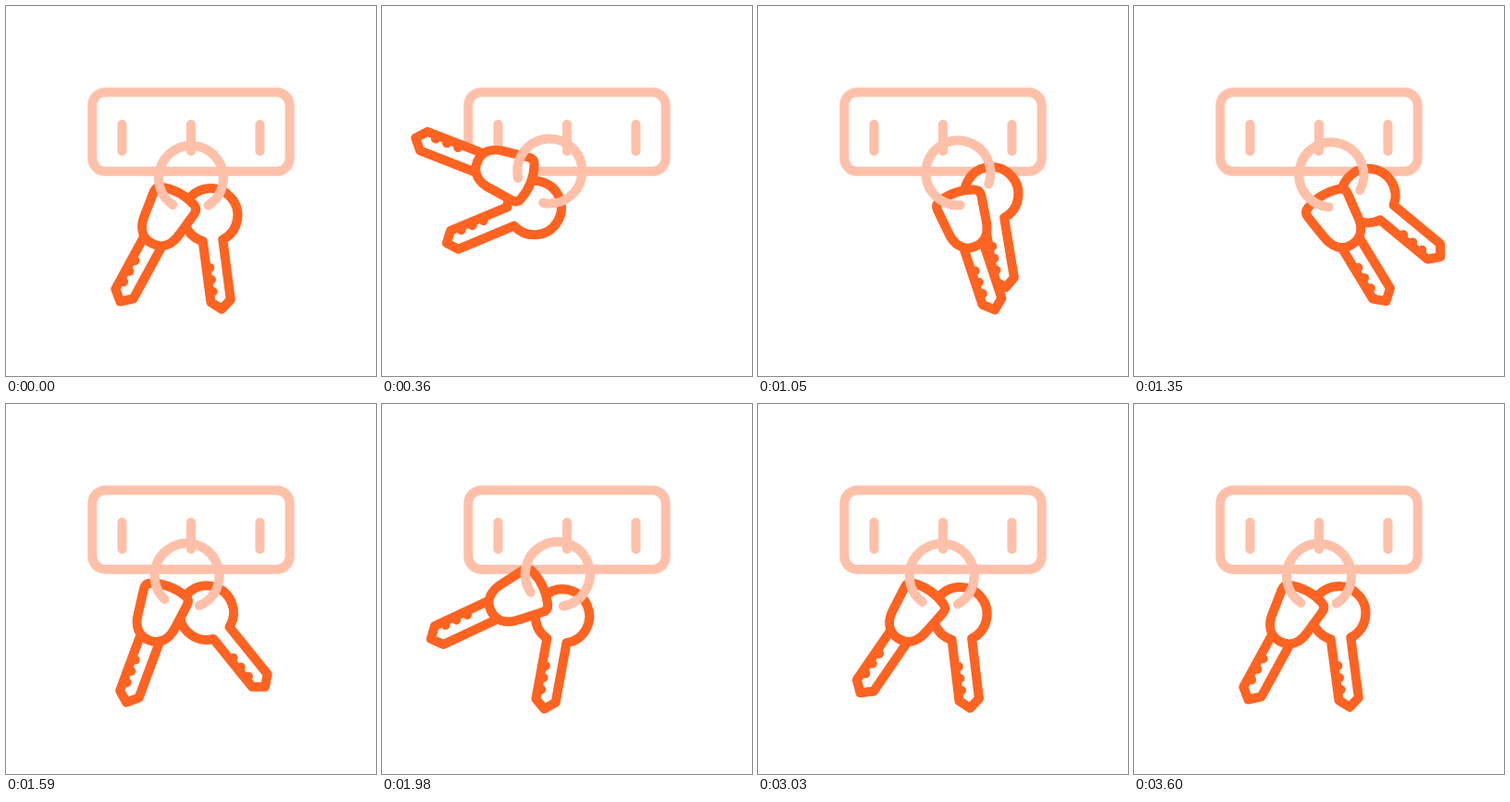
Animation of 400 by 400 pixels, one loop 3.63 s. Source, as an HTML page:

```html
<!DOCTYPE html>
<html lang="en">
<head>
<meta charset="utf-8">
<title>Swinging keys</title>
<style>
  html, body { margin: 0; width: 100%; height: 100%; overflow: hidden; background: #fff; }
  svg { display: block; width: 100%; height: 100%; }
  .line { stroke-width: 10; stroke-linecap: round; stroke-linejoin: round; }
  .pale { stroke: #ffc0a9; fill: none; }
  .key { stroke: #ff6321; fill: #fff; }
</style>
</head>
<body>
<svg viewBox="0 0 400 400">
  <g class="line pale">
    <rect x="93.3" y="93.3" width="213.4" height="85.4" rx="14"/>
    <path d="M125.5 128V157M200 128V157M274.5 128V157"/>
  </g>
  <!-- each key is drawn around the point where it hangs on the ring -->
  <g id="round" class="line key">
    <path d="M-10.8 37.5A29.2 29.2 0 1 1 10.8 38.5V104L0 113L-10.8 104Z"/>
    <path d="M-10 67H-7m0 13h-3m0 13h3"/>
  </g>
  <g id="fob" class="line key">
    <path d="M-11 40V109.5L0 119L11 109.5V40Z"/>
    <path d="M-10 72.5H-7m0 13h-3m0 13h3"/>
    <path d="M-21.5 24L-25 -3Q-25.5 -9 -20 -11Q0 -18 20 -11Q25.5 -9 25 -3L21.5 24C20 39 12 47.5 0 47.5S-20 39 -21.5 24Z"/>
  </g>
  <path id="ring" class="line pale"/>
</svg>
<script>
const LOOP = 3630, STEP = 30;
const HOOK = { x: 200, y: 159 }, DROP = 27, R = 35;
const GAP = { round: 58, fob: 124 };

// a push lasting `first` ms, then swings of `span` ms, each shorter by `shrink`
const SWING = {
  ring: { rest: 0, first: 440, span: 725, shrink: 0.9, turns: [47.5, -43, 29, -9.5, 3] },
  round: { rest: -7.5, first: 490, span: 900, shrink: 0.79, turns: [82, -51, 15, -11, -6.5] },
  fob: { rest: 28.6, first: 430, span: 810, shrink: 0.81, turns: [117, -38.5, 68, 16.5, 40] }
};

const el = id => document.getElementById(id);
const rad = deg => deg * Math.PI / 180;
const ease = p => (1 - Math.cos(Math.PI * p)) / 2;
const polar = (c, r, deg) => ({ x: c.x + r * Math.cos(rad(deg)), y: c.y + r * Math.sin(rad(deg)) });

function angleAt({ rest, first, span, shrink, turns }, t) {
  let from = rest, length = first, next = span;
  for (const to of [...turns, rest]) {
    if (t < length) return from + (to - from) * ease(t / length);
    t -= length;
    from = to;
    length = next;
    next *= shrink;
  }
  return rest;
}

function place(id, p, deg) {
  el(id).setAttribute('transform', `translate(${p.x} ${p.y}) rotate(${deg})`);
}

function draw(t) {
  const tilt = angleAt(SWING.ring, t);
  const center = polar(HOOK, DROP, 90 + tilt);
  place('ring', center, tilt);
  for (const id of ['round', 'fob'])
    place(id, polar(center, R, GAP[id] + tilt), angleAt(SWING[id], t));
}

// open ring, gap at the bottom
const zero = { x: 0, y: 0 };
const a = polar(zero, R, GAP.fob), b = polar(zero, R, GAP.round);
el('ring').setAttribute('d', `M${a.x} ${a.y}A${R} ${R} 0 1 1 ${b.x} ${b.y}`);

const start = performance.now();
function tick() {
  const t = (performance.now() - start) % LOOP;
  draw(Math.floor(t / STEP) * STEP);
  requestAnimationFrame(tick);
}
tick();
</script>
</body>
</html>
```
